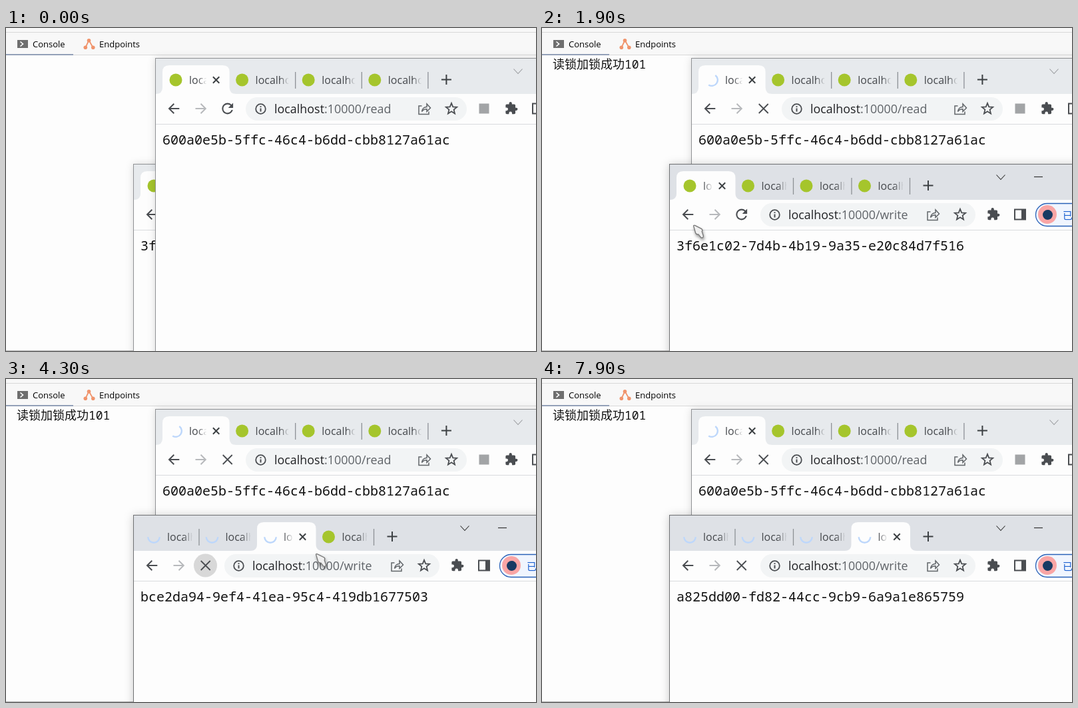
Write an HTML page that moves like this. It is 796x485 px and loops after 8000 ms.

```html
<!DOCTYPE html>
<html lang="zh">
<head>
<meta charset="utf-8">
<title>Read and write locks</title>
<style>
html, body { margin: 0; width: 100%; height: 100%; overflow: hidden; background: #fdfdfd; }
svg { display: block; width: 796px; height: 485px; }
text { white-space: pre; }
.ui { font: 13px "Open Sans", "Noto Sans", sans-serif; fill: #000; }
.tab { font: 16px "Open Sans", "Noto Sans", sans-serif; }
.url { font: 17.9px "Open Sans", "Noto Sans", sans-serif; fill: #5f6368; }
.host { fill: #202124; }
.code { font: 20px "Noto Sans Mono", "DejaVu Sans Mono", monospace; fill: #111; }
.log { font: 300 18px "Noto Sans CJK SC", "Noto Sans CJK", sans-serif; fill: #111; }
.count { font: 18px "Noto Sans Mono", "DejaVu Sans Mono", monospace; }
.blue { font: 15px "Noto Sans CJK SC", "Noto Sans CJK", sans-serif; fill: #1a5fd0; }
.line { fill: none; stroke: currentColor; stroke-width: 2; }
.shadow { filter: drop-shadow(0 0 6px rgba(0, 0, 0, .14)); }
.shadow.front { filter: drop-shadow(0 1px 7px rgba(0, 0, 0, .2)); }
.pointer { filter: drop-shadow(1px 3px 2px rgba(0, 0, 0, .4)); }
</style>
</head>
<body>
<svg viewBox="0 0 796 485">
  <defs>
    <path id="back" class="line" d="M8 0H-7M0 -7.3L-7.3 0L0 7.3"/>
    <path id="stop" class="line" style="stroke-width:1.8" d="M-7 -7L7 7M7 -7L-7 7"/>
    <path id="close" class="line" d="M-4.7 -4.7L4.7 4.7M4.7 -4.7L-4.7 4.7"/>
    <path id="plus" class="line" d="M-7.5 0H7.5M0 -7.5V7.5"/>
    <path id="chevron" class="line" style="stroke-width:1.1" d="M-6.5 -3.5L0 3.5L6.5 -3.5"/>
    <path id="reload" fill="currentColor" transform="scale(1.05) translate(-12 -12)"
      d="M17.65 6.35A7.96 7.96 0 0 0 12 4a8 8 0 1 0 7.73 10h-2.08A6 6 0 1 1 12 6c1.66 0 3.14.69 4.22 1.78L13 11h7V4z"/>
    <g id="info" class="line">
      <circle r="7.3" style="stroke-width:1.8"/><path d="M0 -1V4M0 -4.2V-2.4"/>
    </g>
    <path id="share" class="line" style="stroke-width:1.5"
      d="M-4 -4.5H-8.5V8H6.5V4M-4 4C-3 -1 0 -3 3.5 -3V-7.5L9 -1.5L3.5 4V.2C0 .2 -2 1 -4 4Z"/>
    <path id="puzzle" fill="currentColor" transform="scale(.86) translate(-12 -12.5)"
      d="M20.5 11H19V7c0-1.1-.9-2-2-2h-4V3.5a2.5 2.5 0 0 0-5 0V5H4c-1.1 0-2 .9-2 2v3.8h1.5a2.7 2.7 0 0 1 0 5.4H2V20c0 1.1.9 2 2 2h3.8v-1.5a2.7 2.7 0 0 1 5.4 0V22H17c1.1 0 2-.9 2-2v-4h1.5a2.5 2.5 0 0 0 0-5z"/>
    <g id="panel">
      <rect class="line" x="-8" y="-7.5" width="16" height="15"/>
      <rect fill="currentColor" x="2" y="-7.5" width="6" height="15"/>
    </g>
    <path id="pointer" d="M.6 1.6Q.7 .2 2.6 .8L12.8 6Q14.8 7.6 13.2 10L15.4 16.5Q15.4 20 12 19.2L8 14.2Q4.6 14.6 3.6 11.8Z"
      fill="#efefef" stroke="#777" stroke-width="1.3"/>
  </defs>
  <g id="desk">
    <rect width="796" height="485" fill="#fdfdfd"/>
    <rect width="796" height="41" fill="#f8f8f8"/>
    <path d="M0 6.5H796M0 40.5H796" stroke="#d9d9d9"/>
    <path d="M0 40H101" stroke="#93a0b8" stroke-width="2"/>
    <path d="M0 484.5H191" stroke="#b5b5b5"/>
    <rect x="17" y="18" width="16" height="12" fill="#6e6e6e"/>
    <path d="M21.5 20.5L25.5 24L21.5 27.5" fill="none" stroke="#fff" stroke-width="1.6"/>
    <text class="ui" x="40" y="28.5">Console</text>
    <g fill="#f0946c">
      <path d="M119.5 29L124.5 18.5L130.5 29" fill="none" stroke="#f0946c" stroke-width="1.8"/>
      <circle cx="124.5" cy="18.7" r="2.8"/><circle cx="119.3" cy="29.3" r="2.8"/><circle cx="130.8" cy="29.3" r="2.8"/>
    </g>
    <text class="ui" x="140" y="28.5">Endpoints</text>
  </g>
  <g id="scene"></g>
</svg>
<script>
const LOOP = 8000, STEP = 100;
const WHITE = '#fdfdfd', INK = '#4a4d51', HOVER = '#efefef', PRESS = '#d8d8d8';

// Last value of a [time, value] track at time t
const at = (track, t) => track.reduce((v, [from, next]) => t >= from ? next : v, undefined);

const reader = {
  x: 225, y: 46, pitch: 99.6, pill: [135, 467], puzzle: 534, chevron: 544,
  path: 'read', phase: 35, starts: [900],
  active: [[0, 0]],
  body: [[0, '600a0e5b-5ffc-46c4-b6dd-cbb8127a61ac']],
  stop: [[0, false], [1000, true]],
  button: [[700, HOVER], [900, PRESS], [1100, HOVER], [1200, '']],
  front: [[0, false], [900, true], [1700, false]]
};
const writer = {
  x: 192, y: 205, pitch: 87.5, pill: [136, 459], puzzle: 486, chevron: 497,
  path: 'write', phase: 90, starts: [2200, 3100, 4000, 5300], profile: true,
  active: [[0, 0], [2500, 1], [3500, 2], [4600, 3]],
  body: [
    [0, '3f6e1c02-7d4b-4b19-9a35-e20c84d7f516'],
    [2500, 'b4c71778-c6e8-4154-a7d7-81d4b4a2fd78'],
    [3500, 'bce2da94-9ef4-41ea-95c4-419db1677503'],
    [4600, 'a825dd00-fd82-44cc-9cb9-6a9a1e865759']
  ],
  stop: [[0, false], [2300, true], [2500, false], [3200, true], [3500, false],
    [4100, true], [4600, false], [5500, true]],
  button: [[2100, HOVER], [2200, PRESS], [2400, HOVER], [2700, ''], [2900, HOVER], [3100, PRESS],
    [3300, HOVER], [3500, ''], [3900, HOVER], [4000, PRESS], [4400, ''], [5100, HOVER], [5300, PRESS], [5600, '']],
  hover: [[2400, 1], [2500, -1], [3400, 2], [3500, -1], [4400, 3], [4600, -1]],
  front: [[0, false], [1700, true]]
};

// Pointer tip: time, x, y
const route = [
  [300, 796, 190], [500, 532, 145], [600, 404, 140], [700, 345, 132], [800, 328, 118], [1000, 328, 118],
  [1100, 330, 124], [1200, 292, 215], [1300, 245, 280], [1400, 222, 311], [1500, 195, 366], [1700, 195, 366],
  [1800, 193, 306], [2100, 295, 275], [2300, 295, 275], [2500, 319, 245], [2700, 320, 245],
  [2900, 297, 275], [3200, 297, 275], [3400, 398, 247], [3600, 400, 244], [3900, 298, 276], [4100, 300, 276],
  [4300, 465, 262], [4400, 480, 248], [4700, 484, 246], [5100, 303, 275], [5500, 305, 275], [5700, 310, 305]
];

const use = (id, x, y, color = INK) => `<use href="#${id}" x="${x}" y="${y}" color="${color}"/>`;

const tabShape = (x, w, fill) =>
  `<path fill="${fill}" d="M${x - 10} 53q10 0 10 -10V20q0 -10 10 -10h${w - 20}q10 0 10 10v23q0 10 10 10z"/>`;

function spinner(cx, cy, mid) {
  const point = deg => {
    const a = deg * Math.PI / 180;
    return `${(cx + 8.8 * Math.cos(a)).toFixed(2)} ${(cy + 8.8 * Math.sin(a)).toFixed(2)}`;
  };
  return `<path d="M${point(mid - 88)}A8.8 8.8 0 0 1 ${point(mid + 88)}" fill="none" stroke="#bdd7fb" stroke-width="2.4"/>`;
}

function star(cx, cy) {
  const points = Array.from({ length: 10 }, (_, i) => {
    const a = i * Math.PI / 5 - Math.PI / 2, r = i % 2 ? 3.8 : 8.6;
    return `${(cx + r * Math.cos(a)).toFixed(2)},${(cy + .5 + r * Math.sin(a)).toFixed(2)}`;
  });
  return `<polygon points="${points.join(' ')}" fill="none" stroke="${INK}" stroke-width="1.8"/>`;
}

function fade(id, width) {
  return `<linearGradient id="${id}" gradientUnits="userSpaceOnUse" x1="${width - 14}" x2="${width}">
    <stop stop-color="#45484c"/><stop offset="1" stop-color="#45484c" stop-opacity="0"/></linearGradient>`;
}

function tabs(w, t) {
  const active = at(w.active, t), hover = w.hover ? at(w.hover, t) : -1;
  let out = fade(w.path + 'On', w.pitch - 73) + fade(w.path + 'Off', w.pitch - 49);
  if (hover >= 0) out += tabShape(10 + hover * w.pitch, w.pitch + 1, '#eceef1');
  out += tabShape(10 + active * w.pitch, w.pitch + 1, WHITE);
  for (let i = 0; i < 4; i++) {
    const left = 10 + i * w.pitch, on = i === active;
    out += t >= w.starts[i]
      ? spinner(left + 20, 32, w.phase - .3 * (t - 4300))
      : `<circle cx="${left + 20}" cy="32" r="9.5" fill="#a5c52c"/>`;
    out += `<text class="tab" transform="translate(${left + 40} 38)" fill="url(#${w.path}${on ? 'On' : 'Off'})">localhost</text>`;
    if (on) out += use('close', left + w.pitch - 19, 32, '#3c4043');
    else if (i + 1 !== active) out += `<path d="M${left + w.pitch + .5} 20V45" stroke="#8d9196" stroke-width="1.3"/>`;
  }
  return out + use('plus', 38 + 4 * w.pitch, 31.5, '#3c4043');
}

function toolbar(w, t) {
  const [from, to] = w.pill, button = at(w.button, t);
  let out = use('back', 27.3, 75) + `<g transform="translate(67.5 75) scale(-1 1)">${use('back', 0, 0, '#b7b9bc')}</g>`;
  if (button) out += `<circle cx="107.5" cy="75" r="17.5" fill="${button}"/>`;
  out += use(at(w.stop, t) ? 'stop' : 'reload', 107.7, 75);
  out += `<rect x="${from}" y="58" width="${to - from}" height="35" rx="17.5" fill="#f2f4f5"/>`;
  out += use('info', 157.5, 75.5);
  out += `<text class="url" x="178" y="82"><tspan class="host">localhost</tspan>:10000/${w.path}</text>`;
  out += use('share', to - 63.5, 75.5, '#62666a') + star(to - 23, 75);
  out += use('puzzle', w.puzzle, 75) + use('panel', w.puzzle + 40, 75);
  if (w.profile) {
    out += `<rect x="549.5" y="58.5" width="90" height="34" rx="17" fill="#f0f5fe" stroke="#2a62b8" stroke-width="1.3"/>
      <circle cx="567" cy="75" r="14" fill="#f9a5a5"/><circle cx="567.5" cy="75.5" r="7.5" fill="#173a63"/>
      <text class="blue" x="590" y="82">已</text>`;
  } else {
    out += '<rect x="485.5" y="67.5" width="15" height="15" fill="#a2a4a6"/>';
  }
  return out;
}

function browser(w, t) {
  const front = at(w.front, t), mark = front ? '#333' : '#9a9c9f';
  return `<g transform="translate(${w.x} ${w.y})">
    <rect class="shadow${front ? ' front' : ''}" x="-1" y="-1" width="660" height="520" fill="${front ? '#6f7173' : '#909295'}"/>
    <rect width="660" height="520" fill="${WHITE}"/>
    <rect width="660" height="53" fill="${front ? '#dee1e6' : '#e7eaed'}"/>
    ${tabs(w, t)}
    ${use('chevron', w.chevron, 19, mark)}
    ${w.profile ? `<path d="M547 18.5H560" stroke="${mark}" stroke-width="1.2"/>` : ''}
    ${toolbar(w, t)}
    <path d="M0 98.5H660" stroke="#d9dbde"/>
    <text class="code" x="10" y="129">${at(w.body, t)}</text>
  </g>`;
}

function pointer(t) {
  const i = route.findIndex(stop => stop[0] > t);
  if (i < 1) return '';
  const [t0, x0, y0] = route[i - 1], [t1, x1, y1] = route[i];
  const k = (t - t0) / (t1 - t0);
  return `<g class="pointer"><use href="#pointer" x="${x0 + (x1 - x0) * k}" y="${y0 + (y1 - y0) * k}"/></g>`;
}

function draw(t) {
  const log = t >= 1000 ? '<text class="log" x="16" y="61">读锁加锁成功<tspan class="count">101</tspan></text>' : '';
  const order = at(writer.front, t) ? [reader, writer] : [writer, reader];
  return log + order.map(w => browser(w, t)).join('') + pointer(t);
}

const scene = document.getElementById('scene');
const start = performance.now();
let shown = -1;
function tick() {
  const t = Math.floor((performance.now() - start) % LOOP / STEP) * STEP;
  if (t !== shown) scene.innerHTML = draw(shown = t);
  requestAnimationFrame(tick);
}
tick();
</script>
</body>
</html>
```
